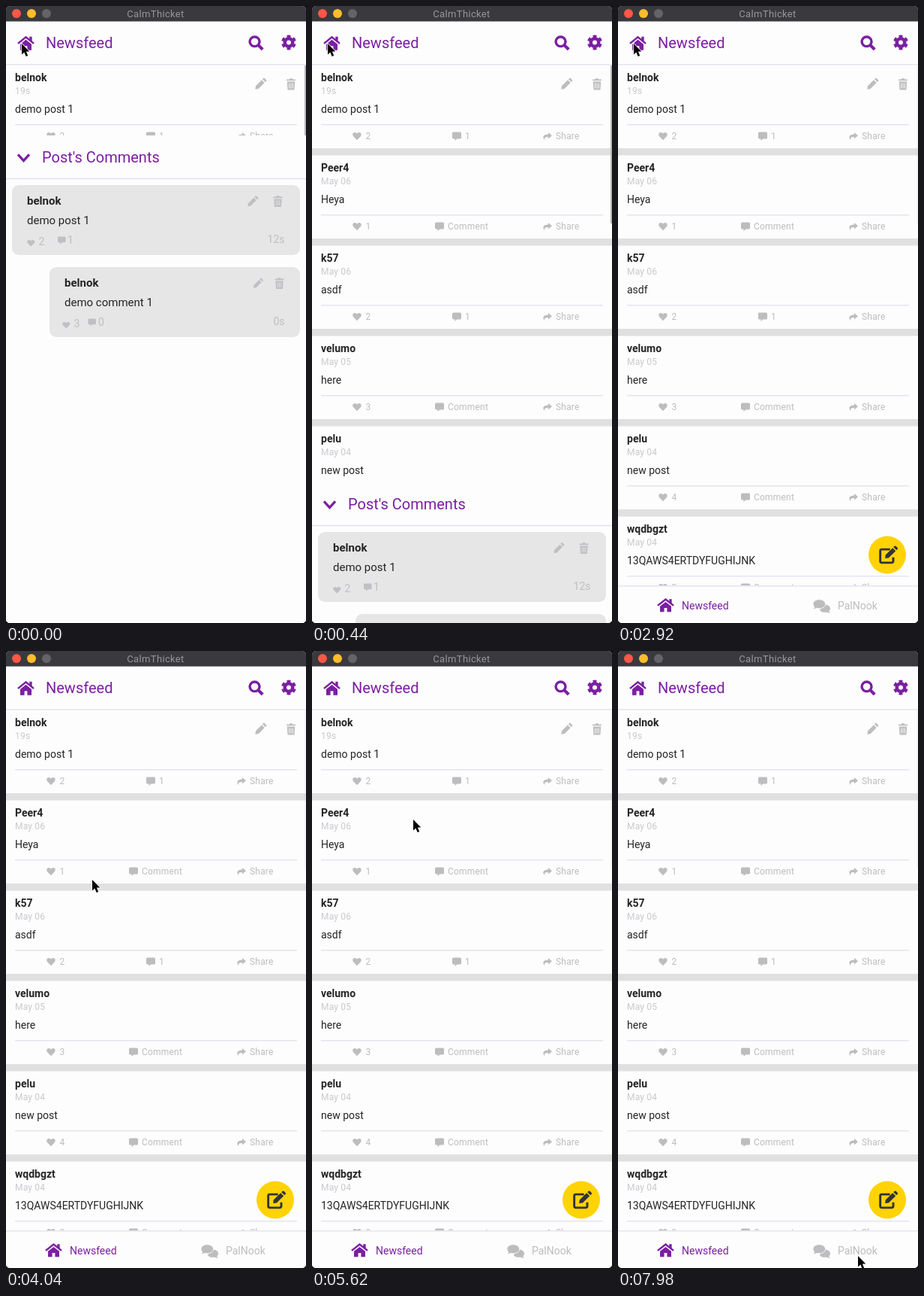
An HTML page that plays this animation: 400 px wide and 820 px high, repeating every 8000 ms.

```html
<!DOCTYPE html>
<html lang="en">
<head>
<meta charset="utf-8">
<title>Newsfeed</title>
<style>
  html, body { margin: 0; width: 100%; height: 100%; overflow: hidden; background: #000; }
  #stage { display: block; width: 400px; height: 820px; clip-path: inset(0 round 5px); }
  text { font-family: Roboto, sans-serif; white-space: pre; }
</style>
</head>
<body>
<svg id="stage" viewBox="0 0 400 820" xmlns="http://www.w3.org/2000/svg"></svg>
<script>
const LOOP = 8000;
const PAGE = '#fdfdfd', PURPLE = '#7b1fa2', INK = '#242424', GREY = '#bdbdbf',
      DATE = '#c9c9ce', LINE = '#e6e4f0', BAND = '#e0e0e0', CARD = '#e6e6e6', CARD_GREY = '#bfbfc4';

// Icons live in a 24 x 24 box and take their colour from the group.
const ICONS = {
  home: `<path d="M1 12.5 12 3 23 12.5" fill="none" stroke="currentColor" stroke-width="2.6"/>
    <path d="M17 2.5H20.5V10L17 7ZM4.2 13.4 12 6.8 19.8 13.4V22H14V16H10V22H4.2Z"/>`,
  search: `<g fill="none" stroke="currentColor" stroke-width="4"><circle cx="10" cy="10" r="7.6"/>
    <path d="M15.5 15.5 22.5 22.5" stroke-width="4.8"/></g>`,
  gear: `<g fill="none" stroke="currentColor"><circle cx="12" cy="12" r="6.3" stroke-width="5.4"/>
    <circle cx="12" cy="12" r="9.8" stroke-width="4.2" pathLength="12" stroke-dasharray="1.1 .9" stroke-dashoffset="-.45"/></g>`,
  heart: `<path d="M12 22.5 2.3 12.5C-1.2 8.5.8 2.4 6 2.2 9 2.1 11 4 12 5.6 13 4 15 2.1 18 2.2 23.2 2.4 25.2 8.5 21.7 12.5Z"/>`,
  bubble: `<path d="M3 1H21Q24 1 24 4V16Q24 19 21 19H13L7 24V19H3Q0 19 0 16V4Q0 1 3 1Z"/>`,
  share: `<path d="M14 2 24 10.5 14 19V14C7 14 3 15 4.5 22.5-2.5 15 0 7 14 7Z"/>`,
  pencil: `<path d="M18 .5 23.5 6 20.5 9 15 3.5ZM13.5 5 19 10.5 7 22.5 .5 23.5 1.5 17Z"/>`,
  trash: `<path fill-rule="evenodd" d="M1 2.5H8L9 .5H15L16 2.5H23V5.2H1ZM2.5 7H21.5L20.2 24H3.8Z
    M7 10H8.6V21H7ZM11.2 10H12.8V21H11.2ZM15.4 10H17V21H15.4Z"/>`,
  chevron: `<path d="M2 6.5 12 17.5 22 6.5" fill="none" stroke="currentColor" stroke-width="4.4"/>`,
  chats: `<path d="M15.5 9.5C20 8.8 24 12 24 16 24 18 23 19.6 22 20.8L24 23.5C21.5 23.6 20 23 18.8 22.2 14 23.2 10.5 21.5 9.3 18.5Z"/>
    <path d="M8.5 1C13.5 1 17.3 4.3 17.3 8.6S13.5 16.2 8.5 16.2Q6.6 16.2 5 15.6 3 17.4-.3 17.4L2 14.2Q0 11.5 0 8.6C0 4.3 3.8 1 8.5 1Z" stroke="${PAGE}"/>`,
  edit: `<path d="M14 5H4Q2 5 2 7V20Q2 22 4 22H16Q18 22 18 20V15" fill="none" stroke="currentColor" stroke-width="2.7"/>
    <path d="M17.2 3.2 21 7 12.3 15.8 8 16.4 8.5 12ZM18.2 2.2 19.6.8Q20.6.2 21.5 1L23.3 2.8Q24 3.7 23.3 4.6L22 6Z"/>`
};

const icon = (name, x, y, w, h, color) =>
  `<g transform="translate(${x} ${y}) scale(${w / 24} ${h / 24})" fill="currentColor" color="${color}">${ICONS[name]}</g>`;
const text = (s, x, y, size, color, extra = '') =>
  `<text x="${x}" y="${y}" font-size="${size}" fill="${color}" ${extra}>${s}</text>`;
const rect = (x, y, w, h, color, r = 0) =>
  `<rect x="${x}" y="${y}" width="${w}" height="${h}" rx="${r}" fill="${color}"/>`;
const BOLD = 'font-weight="700"', RIGHT = 'text-anchor="end"', SPACED = 'letter-spacing=".2"';

const POSTS = [
  ['belnok', '19s', 'demo post 1', 2, 1],
  ['Peer4', 'May 06', 'Heya', 1, 0],
  ['k57', 'May 06', 'asdf', 2, 1],
  ['velumo', 'May 05', 'here', 3, 0],
  ['pelu', 'May 04', 'new post', 4, 0],
  ['wqdbgzt', 'May 04', '13QAWS4ERTDYFUGHIJNK', 2, 0]
];

function post([name, date, body, likes, replies], i) {
  const y = 78 + i * 120;
  const reply = replies
    ? icon('bubble', 187, y + 89, 12, 12, GREY) + text(replies, 204, y + 99, 12, GREY)
    : icon('bubble', 164, y + 89, 12, 12, GREY) + text('Comment', 181, y + 99, 12, GREY, SPACED);
  return text(name, 12, y + 22, 14, INK, BOLD) +
    text(date, 12, y + 39, 12, DATE, SPACED) +
    text(body, 12, y + 64, 14, INK) +
    rect(12, y + 79, 376, 1.5, LINE) +
    icon('heart', 54, y + 89, 12, 12, GREY) + text(likes, 71.5, y + 99, 12, GREY) +
    reply +
    icon('share', 308, y + 89, 12, 12, GREY) + text('Share', 325, y + 99, 12, GREY, SPACED) +
    rect(0, y + 111, 400, 9.5, BAND);
}

function card(x, y, body, likes, replies, age, places) {
  const [heartX, likesX, bubbleX, repliesX, pencilX, trashX, size] = places;
  return rect(x, y, 392 - x, 93, CARD, 9) +
    text('belnok', x + 20, y + 26, 15, INK, BOLD) +
    text(body, x + 20, y + 52, 15, INK) +
    icon('pencil', pencilX, y + 21 - size / 2, size, size, CARD_GREY) +
    icon('trash', trashX, y + 14, 13, 15, CARD_GREY) +
    icon('heart', heartX, y + 72, 10.5, 10, CARD_GREY) + text(likes, likesX, y + 79.5, 14, CARD_GREY) +
    icon('bubble', bubbleX, y + 68, 10.5, 10.5, CARD_GREY) + text(replies, repliesX, y + 77.5, 14, CARD_GREY) +
    text(age, 371.5, y + 77, 14, CARD_GREY, RIGHT);
}

const titleBar = rect(0, 0, 400, 20.5, '#3a393d') +
  [[14, '#ff5648'], [34, '#ffbd2c'], [54, '#646367']]
    .map(([x, c]) => `<circle cx="${x}" cy="10" r="6" fill="${c}"/>`).join('') +
  text('CalmThicket', 199.5, 15, 13, '#98979b', 'text-anchor="middle" letter-spacing=".35"');

const header = icon('home', 15, 38.5, 23, 22, PURPLE) +
  text('Newsfeed', 53, 56, 20, PURPLE) +
  icon('search', 323, 39, 20.5, 20, PURPLE) +
  icon('gear', 367, 38.5, 20, 20, PURPLE) +
  rect(0, 77, 400, 1.5, LINE);

const feed = POSTS.map(post).join('') +
  icon('pencil', 332, 95, 16, 16, GREY) + icon('trash', 373.5, 96, 13, 15.5, GREY) +
  `<g id="scrollbar">${rect(398, 79, 2, 210, '#b4b4b6')}</g>`;

const tabs = `<circle cx="359" cy="729.5" r="25" fill="#ffd306"/>` +
  icon('edit', 347.5, 717, 26, 25, '#333333') +
  rect(0, 770, 400, 50, PAGE) + rect(0, 770, 400, 1.5, LINE) +
  icon('home', 52, 786, 23, 21, PURPLE) + text('Newsfeed', 85, 802, 14, PURPLE) +
  icon('chats', 260, 788, 23, 19, GREY) + text('PalNook', 293, 802, 14, GREY);

const panel = `<g id="panel">` + rect(0, 0, 400, 820, PAGE) +
  icon('chevron', 14.5, 20.5, 18, 18, PURPLE) +
  text("Post's Comments", 48, 36, 20, PURPLE) +
  rect(0, 57, 400, 1.2, '#dedce6') +
  card(8, 66, 'demo post 1', 2, 1, '12s', [28, 43.5, 69, 82, 322, 356, 15]) +
  card(58, 175, 'demo comment 1', 3, 0, '0s', [75, 90.5, 109.5, 123, 329.5, 358, 14]) + `</g>`;

const cursor = `<path id="cursor" d="M0 0V14.6L3.3 11.5 5.7 17 8.2 16 5.9 10.6H10.3Z"
  fill="#000" stroke="#fff" stroke-width="1.6" paint-order="stroke"/>`;

document.getElementById('stage').innerHTML =
  rect(0, 0, 400, 820, PAGE) + feed + header + tabs + panel + titleBar + cursor;

// Motion advances evenly, but every three ticks are shown for 100, 20 and 20 ms.
const TICK = 140 / 3;
const shownAt = n => n ? 20 + 140 * Math.floor((n - 1) / 3) + [0, 100, 120][(n - 1) % 3] : 0;
const ticks = Array.from({ length: 172 }, (_, n) => n).filter(n => shownAt(n) < LOOP);

function play(id, pose) {
  const steps = ticks.map(n => ({ offset: shownAt(n) / LOOP, easing: 'steps(1, end)', ...pose(n * TICK) }));
  steps.push({ ...steps[steps.length - 1], offset: 1 });
  document.getElementById(id).animate(steps, { duration: LOOP, iterations: Infinity });
}

const clamp01 = v => Math.min(1, Math.max(0, v));
const at = (x, y) => ({ transform: `translate(${x}px, ${y}px)` });

// The panel leaves on the tail of a quadratic ease-out.
const LEAVE = 1008;
play('panel', t => at(0, Math.round(820 - 648 * (1 - clamp01(t / LEAVE)) ** 2)));
play('scrollbar', t => ({ opacity: 1 - .9 * clamp01((t - 900) / 580) }));

// Time in ms, x, y of the pointer tip.
const CURSOR_PATH = [
  [0, 21, 50], [3300, 21, 50], [3450, 38, 98], [3650, 82, 222], [3850, 111, 293], [4013, 115, 304],
  [4180, 116, 311], [4400, 117, 308], [5000, 124, 270], [5400, 131, 229], [5647, 135, 224],
  [5740, 144, 238], [5860, 193, 318], [6100, 246, 470], [6350, 286, 620], [6600, 309, 715],
  [6850, 318, 786], [7100, 320, 804], [LOOP, 320, 804]
];
play('cursor', t => {
  const i = CURSOR_PATH.findIndex(p => p[0] > t);
  const [t0, x0, y0] = CURSOR_PATH[i - 1], [t1, x1, y1] = CURSOR_PATH[i];
  const k = (t - t0) / (t1 - t0);
  return at(Math.round(x0 + (x1 - x0) * k), Math.round(y0 + (y1 - y0) * k));
});
</script>
</body>
</html>
```
